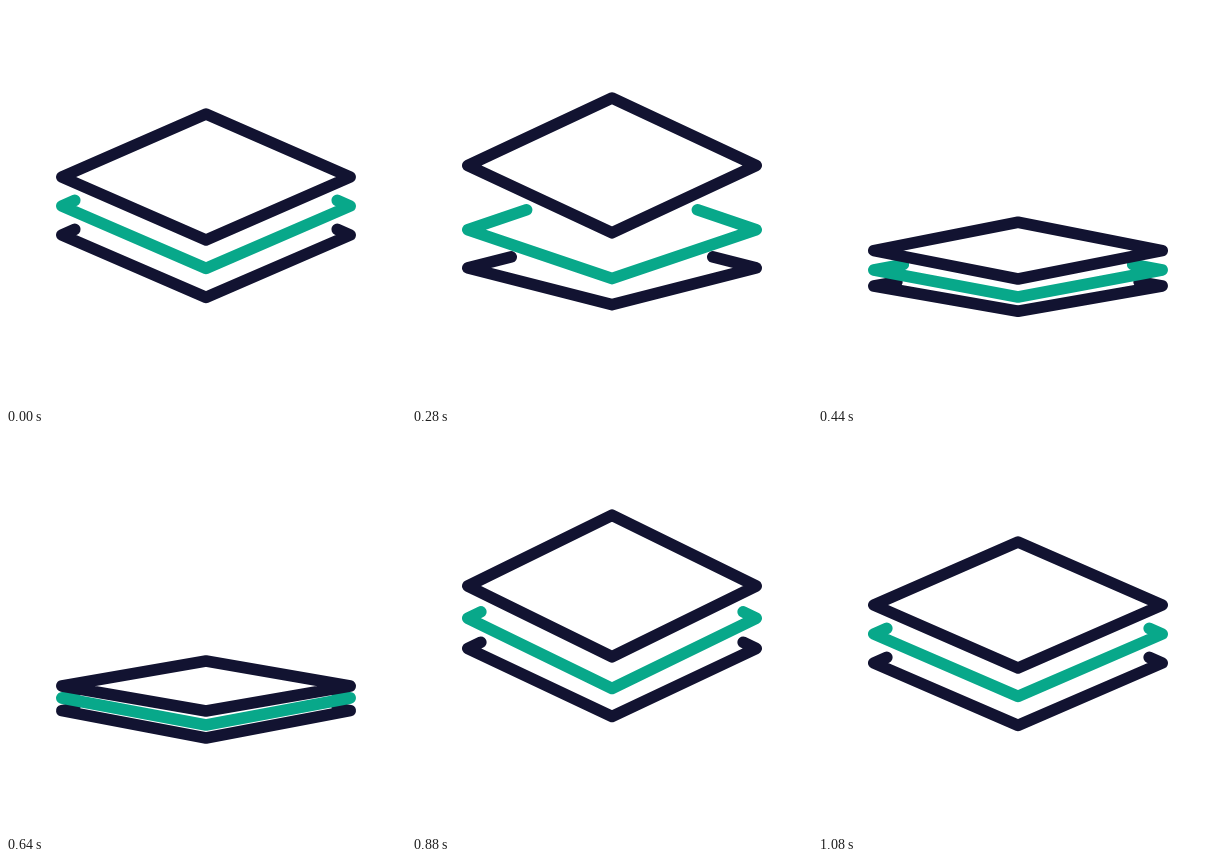
Write an HTML page that moves like this. It is 400x400 px and loops after 2.16 s.

```html
<!DOCTYPE html>
<html lang="en">
<head>
<meta charset="utf-8">
<title>Layers</title>
<style>
  html, body { margin: 0; width: 100%; height: 100%; overflow: hidden; background: #fff; }
  svg { display: block; width: 100%; height: 100%; }
  path { fill: none; stroke: #121331; stroke-width: 11.6; stroke-linecap: round; stroke-linejoin: round; }
  #middle { stroke: #08a88a; }
</style>
</head>
<body>
<svg viewBox="0 0 400 400">
  <path id="bottom"/>
  <path id="middle"/>
  <path id="top"/>
</svg>
<script>
const LOOP = 2160, STEP = 40;
const FALL_TIME = 240, RISE_TIME = 180, SETTLED = 1080;
const MID = 200, REACH = 144.2;
const TAB = 13, TAB_GAP = 21;

// Poses hold the corner height y and the half height h of a layer.
// Each layer lifts, drops flat at `fall`, springs up at `rise`, then settles.
const layers = [
  { id: 'top', fall: 240, rise: 700,
    rest: { y: 171, h: 63 }, up: { y: 152, h: 70.8 }, low: { y: 252, h: 25 } },
  { id: 'middle', fall: 160, rise: 672,
    rest: { y: 200, h: 62.4 }, up: { y: 183.5, h: 70.7 }, low: { y: 264, h: 27 } },
  { id: 'bottom', fall: 120, rise: 616,
    rest: { y: 229, h: 62.4 }, up: { y: 210.5, h: 69.5 }, low: { y: 280, h: 25.3 } }
];
for (const layer of layers) layer.path = document.getElementById(layer.id);

const clamp = x => Math.min(1, Math.max(0, x));

function ease(t, from, to) {
  const u = clamp((t - from) / (to - from));
  return u * u * (3 - 2 * u);
}

const mix = (a, b, u) => ({ y: a.y + (b.y - a.y) * u, h: a.h + (b.h - a.h) * u });

function pose({ fall, rise, rest, up, low }, t) {
  const peak = rise + RISE_TIME;
  if (t < fall) return mix(rest, up, ease(t, fall / 4, fall));
  if (t < rise) return mix(up, low, ease(t, fall, fall + FALL_TIME));
  if (t < peak) return mix(low, up, ease(t, rise, peak));
  return mix(up, rest, ease(t, peak, SETTLED));
}

const diamond = ({ y, h }) =>
  `M${MID - REACH} ${y}L${MID} ${y - h}L${MID + REACH} ${y}L${MID} ${y + h}Z`;

// An open layer: its back edges stop short of the layer above, and its
// front edges start where they emerge from under that layer.
function tray({ y, h }, above) {
  const gap = y - above.y;
  const meet = REACH * gap / (h + above.h);
  const tab = gap > 0 ? Math.max(meet - TAB_GAP, Math.min(TAB, meet)) : 0;
  const start = gap < 0 ? clamp(-gap / (h - above.h)) : 0;
  const reach = REACH * (1 - start);
  const side = y + h * start;
  const tabY = side - h * tab / REACH;
  return `M${MID - reach + tab} ${tabY}L${MID - reach} ${side}L${MID} ${y + h}`
    + `L${MID + reach} ${side}L${MID + reach - tab} ${tabY}`;
}

function draw(now) {
  const t = Math.floor((now % LOOP) / STEP) * STEP;
  let above = null;
  for (const layer of layers) {
    const current = pose(layer, t);
    layer.path.setAttribute('d', above ? tray(current, above) : diamond(current));
    above = current;
  }
}

const start = performance.now();
function tick() {
  draw(performance.now() - start);
  requestAnimationFrame(tick);
}
tick();
</script>
</body>
</html>
```
